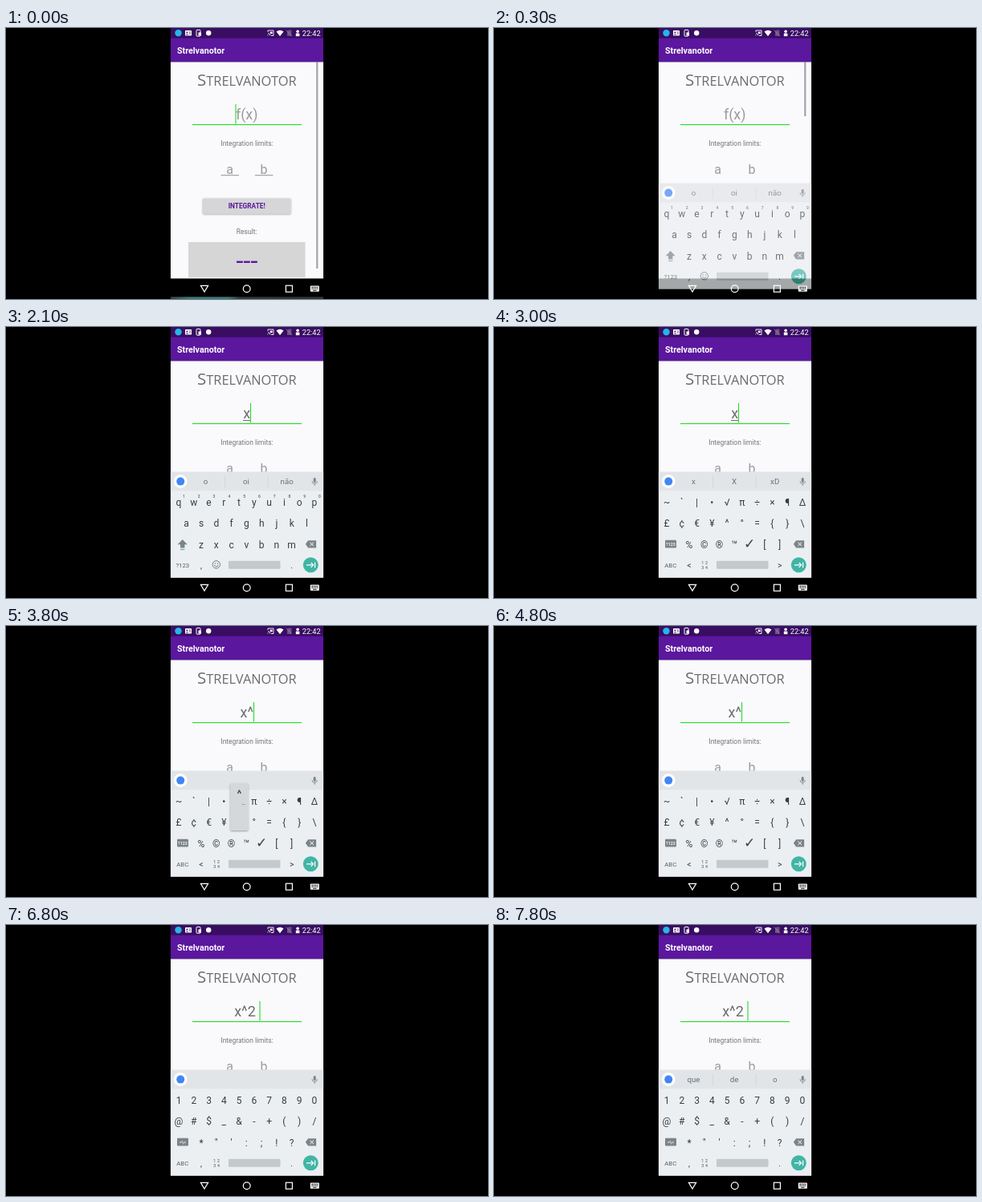
An HTML page for the animation above (8000 ms loop, 600 px wide and 338 px high).

```html
<!DOCTYPE html>
<html lang="en">
<head>
<meta charset="utf-8">
<title>Integral app</title>
<style>
html, body { margin: 0; width: 100%; height: 100%; overflow: hidden; background: #000; }
svg { display: block; width: 600px; height: 338px; }
text { font-family: Roboto, "Noto Sans", "DejaVu Sans", sans-serif; white-space: pre; }
</style>
</head>
<body>
<svg id="stage" viewBox="0 0 600 338" xmlns="http://www.w3.org/2000/svg">
  <defs>
    <clipPath id="view"><rect id="viewBox" x="205" y="42" width="190" height="270.66"/></clipPath>
    <linearGradient id="edge">
      <stop offset="0" stop-color="#3b4144"/><stop offset=".12" stop-color="#3d7773"/>
      <stop offset=".38" stop-color="#3d7773"/><stop offset=".45" stop-color="#34383b"/>
      <stop offset="1" stop-color="#303335"/>
    </linearGradient>
    <filter id="lift" x="-30%" y="-30%" width="160%" height="160%">
      <feDropShadow dx="0" dy=".8" stdDeviation=".8" flood-opacity=".4"/>
    </filter>
  </defs>
</svg>
<script>
const LOOP = 8000;
const PURPLE = '#5b179e', INK = '#343f45', GREY = '#7b8589', GREEN = '#22de26';
// Phone screen edges: a 9:16 portrait centred on the stage
const LEFT = 204.94, WIDTH = 190.12, BAR = 12.67, TOP = 42.24, KEYS = 180.6, NAV = 312.66;
const stage = document.getElementById('stage');
const viewBox = document.getElementById('viewBox');

function add(parent, tag, attrs = {}, content) {
  const node = document.createElementNS('http://www.w3.org/2000/svg', tag);
  for (const key in attrs) node.setAttribute(key, attrs[key]);
  if (content !== undefined) node.textContent = content;
  parent.append(node);
  return node;
}
const group = (parent, attrs) => add(parent, 'g', attrs);
const rect = (parent, x, y, width, height, fill, more) =>
  add(parent, 'rect', { x, y, width, height, fill, ...more });
const band = (parent, y, end, fill) => rect(parent, LEFT, y, WIDTH, end - y, fill);
const disc = (parent, cx, cy, r, fill, more) => add(parent, 'circle', { cx, cy, r, fill, ...more });
const shape = (parent, d, fill, more) => add(parent, 'path', { d, fill, ...more });
const line = (parent, d, stroke, width = 1) =>
  shape(parent, d, 'none', { stroke, 'stroke-width': width });
const label = (parent, x, y, size, fill, content, more) =>
  add(parent, 'text', { x, y, 'font-size': size, fill, 'text-anchor': 'middle', ...more }, content);
const show = (node, on) => node.setAttribute('visibility', on ? 'inherit' : 'hidden');

// App page
band(stage, TOP, NAV, '#faf9fc');
const page = group(stage, { 'clip-path': 'url(#view)' });
const heading = label(page, 299.8, 72, 20.5, '#6c6c6e', '', {
  style: 'font-family: "Open Sans", "Noto Sans", sans-serif', 'font-weight': 500
});
add(heading, 'tspan', {}, 'S');
add(heading, 'tspan', { 'font-size': 16.4 }, 'TRELVANOTOR');
const field = label(page, 299.7, 114.3, 18, '#9b9b9d', 'f(x)');
const composing = rect(page, 295, 116, 9.5, 1, '#6c6c6e');
rect(page, 232, 120, 136, 1.1, GREEN);
const cursor = rect(page, 285, 95, 1.1, 24.5, GREEN);
label(page, 300, 147.4, 8.45, '#757577', 'Integration limits:');
label(page, 278.6, 181.6, 16, '#9b9b9d', 'a');
label(page, 320.9, 181.6, 16, '#9b9b9d', 'b');
rect(page, 267.5, 183.2, 22.5, 1, '#929294');
rect(page, 309.8, 183.2, 22.5, 1, '#929294');
rect(page, 245, 212.5, 109.5, 19, '#d6d6d7', { rx: 1, filter: 'url(#lift)' });
label(page, 299.7, 225.2, 8.3, PURPLE, 'INTEGRATE!', { 'font-weight': 600 });
label(page, 299.7, 257.2, 8.5, '#757577', 'Result:');
rect(page, 227, 267, 145.5, 44, '#d6d6d7');
for (let i = 0; i < 3; i++) rect(page, 287 + i * 9, 290.6, 7.8, 2.4, PURPLE);
const scroll = rect(page, 386.2, 42, 2.2, 258, '#a3a2a6');

// Status and title bars
band(stage, 0, TOP, PURPLE);
band(stage, 0, BAR, '#380d62');
label(stage, 213, 31.6, 10.7, '#fff', 'Strelvanotor', { 'text-anchor': 'start', 'font-weight': 600 });
disc(stage, 214.5, 6.2, 4.2, '#25b5e8');
rect(stage, 223, 3, 8, 6.6, '#fff', { rx: .7 });
disc(stage, 225.4, 5.4, 1, '#380d62');
line(stage, 'M224 8h3M228 5h2M228 7h2', '#380d62', .8);
rect(stage, 237, 2.4, 5, 7.8, 'none', { stroke: '#fff', rx: .8 });
rect(stage, 239.5, 5.5, 3.5, 4, '#fff');
disc(stage, 252.2, 6.2, 3.2, '#fff');
line(stage, 'M326 5V3h7v6.5h-3M326 9.5v-1M326 6.7q2.8 0 2.8 2.8', '#fff', .9);
rect(stage, 328.8, 4.6, 2.8, 2.6, '#fff');
shape(stage, 'M336.5 4.5q4.5-3.4 9 0L341 10.2z', '#fff');
shape(stage, 'M350 4l2-1.6h3.4V10H350z', '#6d5288');
line(stage, 'M348.8 2.6l7 7.6', '#a08bb5', .8);
shape(stage, 'M360.8 10.2V7.5q0-1 1-1h2.6q1 0 1 1v2.7z', '#fff');
disc(stage, 363.1, 4.2, 1.8, '#fff');
label(stage, 380.2, 9.9, 9.2, '#fff', '22:42');

// Bottom bar, below and above the keyboard
band(stage, NAV, 338, '#000');
const edge = rect(stage, LEFT, 335.3, WIDTH, 2.7, 'url(#edge)');
const board = group(stage);
const nav = group(stage);
line(nav, 'M242.4 321.4h9.2L247 329z', '#fff', 1.2);
disc(nav, 299.7, 325.2, 4.4, 'none', { stroke: '#fff', 'stroke-width': 1.2 });
rect(nav, 348.4, 321.2, 8, 8, 'none', { stroke: '#fff', 'stroke-width': 1.2 });
rect(nav, 378.8, 321.4, 11, 7.4, '#fff', { rx: .8 });
line(nav, 'M380.3 323.3h8M380.3 325.2h8', '#000', 1);
line(nav, 'M382 327.3h4.6', '#000', .9);
for (let i = 0; i < 3; i++) rect(nav, 382 + i * 2, 322.6, .6, 3.4, '#fff');

// Keyboard parts common to all layouts
band(board, KEYS, NAV, '#eceff1');
band(board, KEYS, 204.4, '#e2e5e8');
disc(board, 217.2, 192.6, 8.4, '#fff');
disc(board, 217.2, 192.6, 5, '#4285f4');
rect(board, 382.7, 188, 3, 6, '#7d868a', { rx: 1.5 });
line(board, 'M381 192.3q0 3.2 3.2 3.2t3.2-3.2M384.2 195.5v2.3', '#7d868a', .9);
const strip = group(board);
line(strip, 'M272.5 186v14M326 186v14', '#cfd4d7', .8);
const words = [248.5, 299, 349.7].map(x => label(strip, x, 196.4, 9.7, '#667177', ''));
shape(board, 'M372.8 270.8l3.3-4.6h10v9.2h-10z', GREY);
line(board, 'M378.4 268.5l4.6 4.6M383 268.5l-4.6 4.6', '#fff', 1);
rect(board, 277, 291.8, 64.5, 10, '#c4c9cc', { rx: 1.2 });
disc(board, 379.3, 296.8, 9.5, '#41b5a6');
line(board, 'M374 296.8h8.4M379.6 293.8l3 3-3 3M384.6 293.4v6.8', '#fff', 1.2);

const PITCH = 18.77;
const rowY = [223, 248.9, 275.5];
const wideGlyphs = { '™': 13, '✓': 17 };
function layout(rows, starts, corner, comma, period) {
  const keys = group(board);
  rows.forEach((row, r) => [...row].forEach((char, i) => {
    label(keys, starts[r] + i * PITCH, rowY[r], wideGlyphs[char] || 12, INK, char);
  }));
  label(keys, 219.8, 299.8, 7.8, '#566167', corner);
  label(keys, 243, 300.6, 10.5, INK, comma);
  label(keys, 355.7, 300.6, 10.5, INK, period);
  return keys;
}
function digitLayout(rows, toggle, comma, period) {
  const keys = layout(rows, [215, 215, 243], 'ABC', comma, period);
  rect(keys, 213, 265.8, 14, 9.6, GREY, { rx: 1.2 });
  label(keys, 220, 272.6, 5.4, '#fff', toggle, { 'font-weight': 500 });
  label(keys, 262, 296, 6, '#566167', '1 2');
  label(keys, 262, 302.2, 6, '#566167', '3 4');
  return keys;
}
const letters = layout(['qwertyuiop', 'asdfghjkl', 'zxcvbnm'], [215, 224.4, 243], '?123', ',', '.');
[...'1234567890'].forEach((d, i) =>
  label(letters, 221.5 + i * PITCH, 213, 5, '#566167', d, { 'font-weight': 500 }));
shape(letters, 'M219.7 265l6 6.2h-3.3v4.2H217v-4.2h-3.3z', GREY);
rect(letters, 217, 276.9, 5.4, 1.2, '#6ba9a3');
disc(letters, 261.8, 296.3, 4.7, 'none', { stroke: '#667177', 'stroke-width': .9 });
disc(letters, 260.2, 295, .7, '#667177');
disc(letters, 263.4, 295, .7, '#667177');
line(letters, 'M259.2 297.4q2.6 3 5.2 0', '#667177', .9);
const layouts = {
  letters,
  numbers: digitLayout(['1234567890', '@#$_&-+()/', '*"\':;!?'], '=\\<', ',', '.'),
  symbols: digitLayout(['~`|•√π÷×¶Δ', '£¢€¥^°={}\\', '%©®™✓[]'], '?123', '<', '>')
};

const bubble = group(board);
rect(bubble, -11, -48, 22, 58.5, '#d5d8da', { rx: 1.5, filter: 'url(#lift)' });
const bubbleChar = label(bubble, 0, -31, 13.5, INK, '', { 'font-weight': 500 });
const bubbleMore = label(bubble, 5.4, -22, 6.5, INK, '…');

// Each step overrides part of the state from its time onward.
const steps = [
  [0, { text: '', caret: 286, on: true, keys: 'letters', words: 'o oi não', pop: null }],
  [100, { on: false }],
  [600, { on: true }],
  [1100, { on: false }],
  [1600, { on: true }],
  [1900, { pop: ['x', 262, 271] }],
  [2000, { text: 'x', caret: 304.5 }],
  [2100, { pop: null }],
  [2300, { words: 'x X xD' }],
  [2500, { on: false }],
  [2600, { keys: 'numbers' }],
  [3000, { on: true, keys: 'symbols' }],
  [3500, { on: false }],
  [3800, { on: true, text: 'x^', caret: 308.5, words: '', pop: ['^', 290.3, 244.5] }],
  [4000, { pop: null }],
  [4300, { on: false }],
  [4800, { on: true }],
  [5300, { on: false, keys: 'numbers' }],
  [5800, { on: true }],
  [5900, { pop: ['2', 233.8, 218.5] }],
  [6000, { text: 'x^2', caret: 312.8 }],
  [6100, { pop: null }],
  [6500, { on: false }],
  [6800, { on: true, text: 'x^2 ', caret: 316 }],
  [6900, { words: 'que de o' }],
  [7300, { on: false }],
  [7800, { on: true }]
];
// Keyboard entry per 100 ms: [offset, opacity]
const rise = [[27, 0], [27, .2], [21, .48], [13, .7], [5, .9], [1, .98], [0, 1]];

function draw(t) {
  const state = {};
  for (const [at, change] of steps) if (at <= t) Object.assign(state, change);
  const tick = Math.floor(t / 100);

  const [drop, alpha] = rise[Math.min(tick, rise.length - 1)];
  board.setAttribute('transform', `translate(0 ${drop})`);
  board.setAttribute('opacity', alpha);
  const open = t >= 100;
  show(edge, !open);
  viewBox.setAttribute('height', open ? 141 : 270.66);
  scroll.setAttribute('height', open ? 68 : 258);
  scroll.setAttribute('opacity', Math.max(0, Math.min(1, 1 - (tick - 8) / 4)));

  field.textContent = state.text || 'f(x)';
  field.setAttribute('fill', state.text ? '#6c6c6e' : '#9b9b9d');
  show(composing, state.text === 'x');
  cursor.setAttribute('x', state.caret - .55);
  show(cursor, state.on);

  for (const name in layouts) show(layouts[name], name === state.keys);
  show(strip, state.words !== '');
  const parts = state.words.split(' ');
  words.forEach((node, i) => { node.textContent = parts[i] || ''; });

  show(bubble, state.pop);
  if (state.pop) {
    const [char, x, y] = state.pop;
    bubble.setAttribute('transform', `translate(${x} ${y})`);
    bubbleChar.textContent = char;
    show(bubbleMore, char !== 'x');
  }
}

const start = performance.now();
function frame() {
  draw((performance.now() - start) % LOOP);
  requestAnimationFrame(frame);
}
frame();
</script>
</body>
</html>
```
